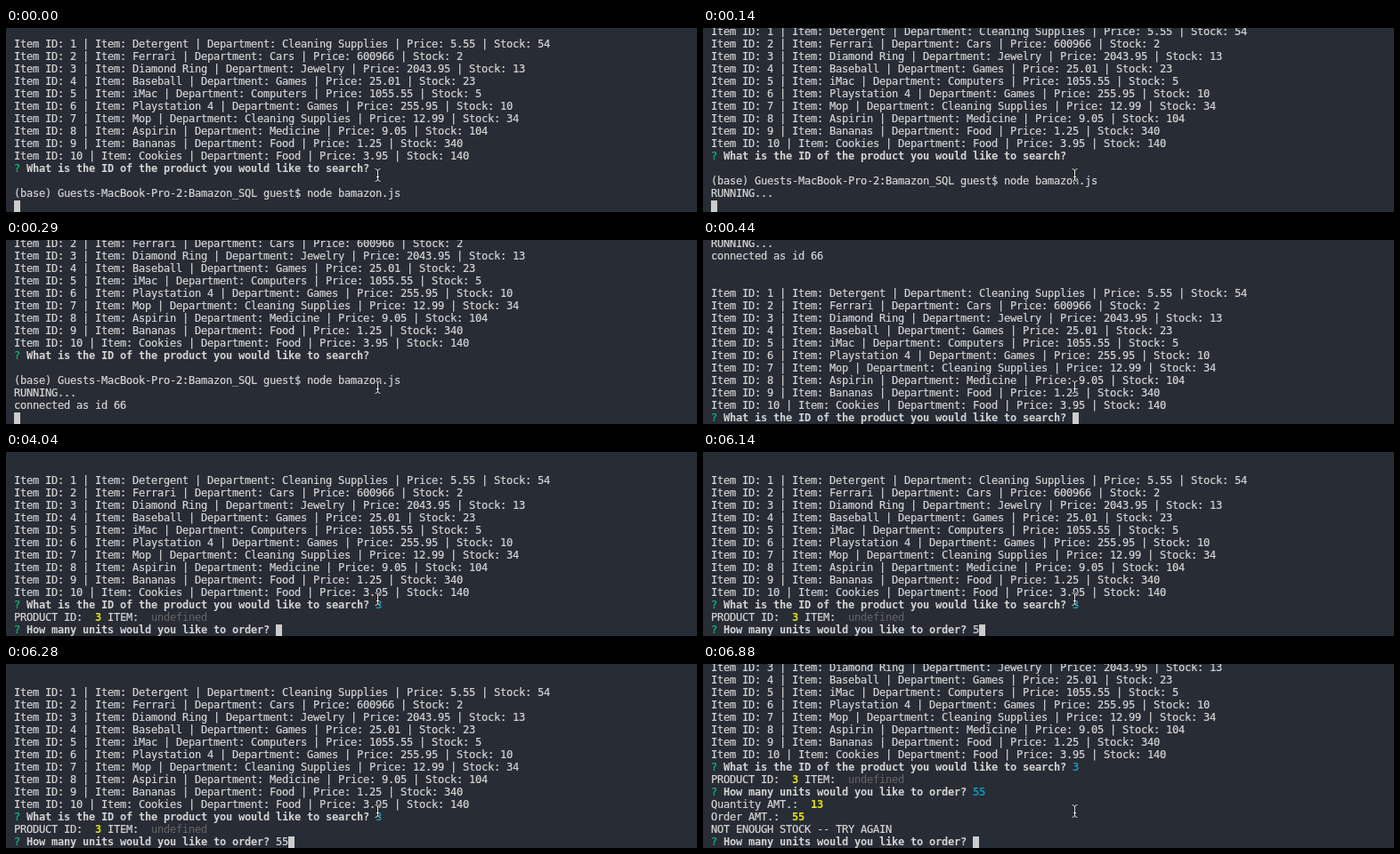
An HTML page that plays this animation: 776x207 px, repeating every 8 s.

```html
<!DOCTYPE html>
<html lang="en">
<head>
<meta charset="utf-8">
<title>Terminal session</title>
<style>
  html, body { margin: 0; width: 100%; height: 100%; overflow: hidden; background: #282c34; }
  pre {
    position: absolute; left: 9px; top: -3px; margin: 0;
    font: 12px/14px "DejaVu Sans Mono", monospace;
    letter-spacing: calc(7px - 1ch);
    color: #d4d4d4;
    -webkit-text-stroke: .2px;
  }
  b { -webkit-text-stroke: 0; }
  .green { color: #0dbc79; }
  .cyan { color: #11a8cd; }
  .yellow { color: #e5e510; }
  .gray { color: #666; -webkit-text-stroke: 0; }
  .cursor { display: inline-block; width: 7px; height: 13px; vertical-align: bottom; background: #ccc; }
  svg { position: absolute; left: 412px; top: 157px; fill: none; }
</style>
</head>
<body>
<pre id="screen"></pre>
<svg width="11" height="17">
  <path id="beam" d="M2.5 1.5Q5.5 1.5 5.5 4V13Q5.5 15.5 2.5 15.5M8.5 1.5Q5.5 1.5 5.5 4M8.5 15.5Q5.5 15.5 5.5 13M4 10.5H7" stroke="#1a1c20" stroke-width="2"/>
  <use href="#beam"/>
  <path d="M2.5 1.5Q5.5 1.5 5.5 4V13Q5.5 15.5 2.5 15.5M8.5 1.5Q5.5 1.5 5.5 4M8.5 15.5Q5.5 15.5 5.5 13M4 10.5H7" stroke="#e8e8e8"/>
</svg>
<script>
const LOOP = 8000, ROWS = 15;
const screen_ = document.getElementById('screen');

const paint = (color, text) => `<span class="${color}">${text}</span>`;
const strong = text => `<b class="yellow">${text}</b>`;
const ask = text => `${paint('green', '?')} <b>${text}</b> `;

const products = [
  ['Detergent', 'Cleaning Supplies', '5.55', 54],
  ['Ferrari', 'Cars', '600966', 2],
  ['Diamond Ring', 'Jewelry', '2043.95', 13],
  ['Baseball', 'Games', '25.01', 23],
  ['iMac', 'Computers', '1055.55', 5],
  ['Playstation 4', 'Games', '255.95', 10],
  ['Mop', 'Cleaning Supplies', '12.99', 34],
  ['Aspirin', 'Medicine', '9.05', 104],
  ['Bananas', 'Food', '1.25', 340],
  ['Cookies', 'Food', '3.95', 140]
].map(([item, department, price, stock], i) =>
  `Item ID: ${i + 1} | Item: ${item} | Department: ${department} | Price: ${price} | Stock: ${stock}`
).join('\n');

const askId = ask('What is the ID of the product you would like to search?');
const askUnits = ask('How many units would you like to order?');

// Full terminal output at each moment; only the last rows are visible.
const start = `\n${products}\n${askId}\n\n(base) Guests-MacBook-Pro-2:Bamazon_SQL guest$ node bamazon.js\n`;
const running = start + 'RUNNING...\n';
const connected = running + 'connected as id 66\n';
const listed = `${connected}\n\n${products}\n${askId}`;
const chosen = `${listed}${paint('cyan', 3)}\nPRODUCT ID:  ${strong(3)} ITEM:  ${paint('gray', 'undefined')}\n${askUnits}`;
const refused = `${chosen}${paint('cyan', 55)}\nQuantity AMT.:  ${strong(13)}\nOrder AMT.:  ${strong(55)}\n`
  + `NOT ENOUGH STOCK -- TRY AGAIN\n${askUnits}`;

const steps = [
  [0, start], [140, running], [290, connected], [440, listed], [3890, listed + '3'],
  [4040, chosen], [6140, chosen + '5'], [6280, chosen + '55'], [6880, refused]
];

let shown;
function render() {
  const t = performance.now() % LOOP;
  const [, output] = steps.findLast(([time]) => time <= t);
  if (output !== shown) {
    shown = output;
    // The leading newline is kept by innerHTML on an existing element.
    screen_.innerHTML = output.split('\n').slice(-ROWS).join('\n') + '<span class="cursor"></span>';
  }
  requestAnimationFrame(render);
}
render();
</script>
</body>
</html>
```
